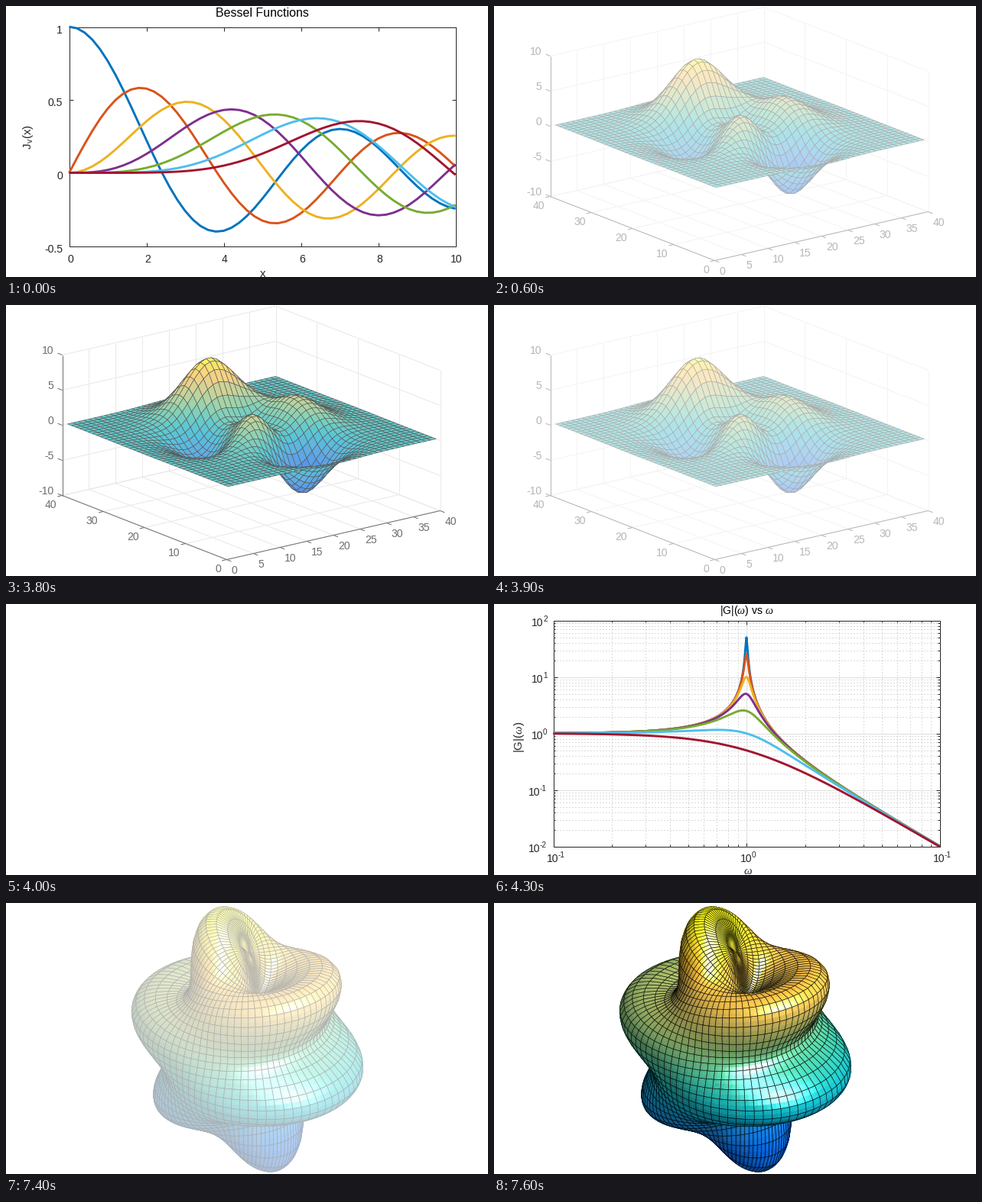
A matplotlib script for the animation above (8 s loop, 630 by 355 pixels).

```python
import numpy as np
import matplotlib.pyplot as plt
from matplotlib.animation import FuncAnimation
from matplotlib.collections import LineCollection, PolyCollection
from matplotlib.patches import Rectangle

W, H, DPI = 630, 355, 64
PX = 72 / DPI  # points per pixel
INK, GRID, MINOR = "#262626", "#dedede", "#b8b8b8"
COLORS = ["#0072BD", "#D95319", "#EDB120", "#7E2F8E",
          "#77AC30", "#4DBEEE", "#A2142F"]
RAMP = np.array([
    (.012, .388, .882), (.063, .474, .855), (.064, .557, .824),
    (.023, .642, .791), (.084, .693, .706), (.259, .732, .595),
    (.487, .749, .484), (.683, .744, .404), (.851, .730, .336),
    (.994, .746, .240), (.970, .848, .148), (.976, .983, .054)])

plt.rcParams.update({
    "font.family": "Liberation Sans",
    "mathtext.fontset": "custom",
    "mathtext.rm": "Liberation Sans",
    "mathtext.it": "Liberation Serif:italic",
})

fig = plt.figure(figsize=(W / DPI, H / DPI), dpi=DPI, facecolor="white")


def stage():
    """Full-size axes; pixels are counted from 1 at the top left."""
    ax = fig.add_axes([0, 0, 1, 1])
    ax.set_xlim(0.5, W + 0.5)
    ax.set_ylim(H + 0.5, 0.5)
    ax.axis("off")
    return ax


def segments(ax, segs, color=INK, width=1, style="solid"):
    ax.add_collection(LineCollection(segs, colors=color, linewidths=width * PX,
                                     linestyles=style), autolim=False)


def label(ax, x, y, text, size=14, ha="center", color=INK, **kw):
    """Text whose capitals are centred on height y."""
    ax.text(x, y + 0.36 * size, text, size=size * PX, ha=ha, va="baseline",
            color=color, **kw)


def side_label(ax, x, y, text, size=15):
    ax.text(x, y, text, size=size * PX, ha="center", va="baseline",
            rotation=90, rotation_mode="anchor", color=INK)


def power(ax, x, y, exponent):
    label(ax, x, y, "10", ha="right")
    label(ax, x - 0.5, y - 4, exponent, size=10, ha="left")


def ticks(ax, box, xs, ys, size):
    """Inward ticks on all four sides."""
    l, t, r, b = box
    for x in xs:
        segments(ax, [[(x, b), (x, b - size)], [(x, t), (x, t + size)]])
    for y in ys:
        segments(ax, [[(l, y), (l + size, y)], [(r, y), (r - size, y)]])


def frame(ax, box):
    l, t, r, b = box
    ax.add_patch(Rectangle((l, t), r - l, b - t, fill=False, ec=INK, lw=PX,
                           joinstyle="miter"))


def curve(ax, x, y, color):
    ax.plot(x, y, color=color, lw=2.9 * PX, solid_capstyle="butt",
            solid_joinstyle="round", zorder=3)


def ramp(t):
    spots = np.arange(8, 64, 5) / 63
    return np.stack([np.interp(t, spots, RAMP[:, k]) for k in range(3)], -1)


def quads(p):
    """Corner points of every cell of a point grid."""
    return np.stack([p[:-1, :-1], p[1:, :-1], p[1:, 1:], p[:-1, 1:]], 2)


def bessel(n, x):
    tau = (np.arange(400) + 0.5) * np.pi / 400
    return np.cos(n * tau - np.outer(x, np.sin(tau))).mean(axis=1)


def bessel_scene():
    ax = stage()
    box = l, t, r, b = 83, 28, 588, 315
    xs = [l + 101 * k for k in range(6)]
    ys = [28, 123, 219, 315]
    frame(ax, box)
    ticks(ax, box, xs, ys, 5)
    for k, x in enumerate(xs):
        label(ax, x + 1.5, 331, str(2 * k))
    for y, s in zip(ys, ["1", "0.5", "0", "-0.5"]):
        label(ax, 74.5, y + 3, s, ha="right")
    label(ax, 335.5, 8.5, "Bessel Functions", size=16, color="black")
    label(ax, 336.5, 350, "x", size=15)
    side_label(ax, 33, 172, r"J$_{\,\mathrm{v}}$(x)")
    x = np.arange(51) / 5
    for n, c in enumerate(COLORS):
        curve(ax, l + 50.5 * x, 219 - 191.3 * bessel(n, x), c)
    return ax


def peaks(x, y):
    return (3 * (1 - x) ** 2 * np.exp(-x ** 2 - (y + 1) ** 2)
            - 10 * (x / 5 - x ** 3 - y ** 5) * np.exp(-x ** 2 - y ** 2)
            - np.exp(-(x + 1) ** 2 - y ** 2) / 3)


def iso(x, y, z):
    return np.stack([289 + 6.975 * x - 5.375 * y,
                     242 - 1.6 * x - 2.1 * y - 9.2 * z], -1)


def peaks_scene():
    ax = stage()
    xs, ys, zs = range(0, 41, 5), range(0, 41, 10), range(-10, 11, 5)

    def line(a, b):
        return [iso(*a), iso(*b)]

    grid = []
    for x in xs:
        grid += [line((x, 0, -10), (x, 40, -10)), line((x, 40, -10), (x, 40, 10))]
    for y in ys:
        grid += [line((0, y, -10), (40, y, -10)), line((40, y, -10), (40, y, 10))]
    for z in zs:
        grid += [line((0, 40, z), (40, 40, z)), line((40, 40, z), (40, 0, z))]
    segments(ax, grid, GRID)

    marks = [line((0, 0, -10), (40, 0, -10)), line((0, 0, -10), (0, 40, -10)),
             line((0, 40, -10), (0, 40, 10))]
    for x in xs:
        marks.append(line((x, 0, -10), (x, -1.1, -10)))
        px, py = iso(x, 0, -10)
        label(ax, px + 6, py + 13, str(x), ha="left")
    for y in ys:
        marks.append(line((0, y, -10), (-0.9, y, -10)))
        px, py = iso(0, y, -10)
        label(ax, px - 7.5, py + 11, str(y), ha="right")
    for z in zs:
        marks.append(line((0, 40, z), (0, 41.1, z)))
        label(ax, 63, iso(0, 40, z)[1] - 7, str(z), ha="right")
    segments(ax, marks)

    n = np.arange(1, 41)
    x, y = np.meshgrid(n, n)
    z = peaks((x - 1) / 6.5 - 3, (y - 1) / 6.5 - 3)
    faces = ramp((z - z.min()) / np.ptp(z))[:-1, :-1].reshape(-1, 3)
    order = np.argsort(-(x + y)[:-1, :-1].ravel(), kind="stable")
    cells = quads(iso(x, y, z)).reshape(-1, 4, 2)
    ax.add_collection(PolyCollection(
        cells[order], facecolors=faces[order], edgecolors="black",
        linewidths=0.6 * PX, joinstyle="round", zorder=3), autolim=False)
    return ax


def gain_scene():
    ax = stage()
    box = l, t, r, b = 78, 22, 583, 318
    dx, dy = 252.5, 74
    xs = [l + dx * k for k in range(3)]
    ys = [b - dy * k for k in range(5)]
    logs = np.log10(np.arange(2, 10))
    minor_x = [round(x + dx * g) for x in xs[:-1] for g in logs]
    minor_y = [round(y - dy * g) for y in ys[:-1] for g in logs]

    def mesh(cols, rows):
        return ([[(x, b), (x, t)] for x in cols]
                + [[(l, y), (r, y)] for y in rows])

    segments(ax, mesh(minor_x, minor_y), MINOR, style=(0, (1, 3)))
    segments(ax, mesh(xs[1:-1], ys[1:-1]), GRID)
    frame(ax, box)
    ticks(ax, box, xs, ys, 5)
    ticks(ax, box, minor_x, minor_y, 2.5)

    for x, s in zip(xs, ["-1", "0", "-1"]):
        power(ax, x + 7, 333, s)
    for k, y in enumerate(ys):
        power(ax, 60.5 if k < 2 else 65, y + 2, str(k - 2))
    ax.text(330.5, 14, r"|G|($\omega$) vs $\omega$", size=14 * PX,
            ha="center", va="baseline", color="black")
    ax.text(332.5, 354, r"$\omega$", size=15 * PX, ha="center", va="baseline",
            color=INK)
    side_label(ax, 37.5, 175, r"|G|($\omega$)")

    e = np.linspace(-1, 1, 401)
    w = 10 ** e
    for zeta, c in zip([.01, .02, .05, .1, .2, .5, 1], COLORS):
        gain = 1 / np.hypot(1 - w ** 2, 2 * zeta * w)
        curve(ax, l + dx * (e + 1), 170 - dy * np.log10(gain), c)
    return ax


def harmonic_scene():
    ax = stage()
    rows, cols = 40, 80
    theta = np.linspace(0, np.pi, 2 * rows + 1)[:, None]
    phi = np.linspace(0, 2 * np.pi, 2 * cols + 1)[None, :]
    u = np.cos(theta)
    wave = -np.sin(theta) * (33 * u ** 5 - 30 * u ** 3 + 5 * u)
    radius = 1 + 0.4 * wave / np.abs(wave).max() * np.cos(phi)
    p = np.stack([radius * np.sin(theta) * np.cos(phi),
                  radius * np.sin(theta) * np.sin(phi), radius * u], -1)

    az, el = np.radians([40, 30])
    right = np.array([np.cos(az), np.sin(az), 0])
    up = np.array([-np.sin(az) * np.sin(el), np.cos(az) * np.sin(el), np.cos(el)])
    eye = np.cross(right, up)
    light = np.array([1, 0, 1]) / np.sqrt(2)

    def flat(q):
        return np.stack([316 + 132.3 * q @ right, 179 - 132.3 * q @ up], -1)

    def normals(q):
        n = np.cross(q[..., 2, :] - q[..., 0, :], q[..., 3, :] - q[..., 1, :])
        n /= np.linalg.norm(n, axis=-1, keepdims=True) + 1e-12
        return n * np.sign((n * q.mean(-2)).sum(-1, keepdims=True))

    fine, coarse = quads(p), quads(p[::2, ::2])
    n = normals(fine)
    lit = n @ light
    mirror = 2 * lit[..., None] * n - light
    shine = 0.7 * np.where(lit > 0, np.clip(mirror @ eye, 0, 1), 0) ** 10
    z = fine[..., 2].mean(-1)
    base = ramp((z / p[..., 2].max() + 1) / 2)
    rgb = base * (0.58 + 0.62 * np.clip(lit, 0, 1))[..., None] + shine[..., None]
    rgba = np.concatenate([np.clip(rgb, 0, 1), np.ones(z.shape + (1,))], -1)

    # Each cell is four shaded patches followed by its black outline.
    def grouped(a):
        a = a.reshape(rows, 2, cols, 2, -1).swapaxes(1, 2)
        return a.reshape(rows * cols, 4, -1)

    outline = flat(coarse).reshape(-1, 1, 8)
    polys = np.concatenate([grouped(flat(fine)), outline], 1)
    patch = grouped(rgba)
    blank = np.zeros((rows * cols, 1, 4))
    faces = np.concatenate([patch, blank], 1)
    edges = np.concatenate([patch, blank + [0, 0, 0, 1]], 1)

    depth = (coarse.mean(-2) @ eye).ravel()
    order = np.argsort(depth)
    order = order[(normals(coarse) @ eye).ravel()[order] > -0.1]
    ax.add_collection(PolyCollection(
        polys[order].reshape(-1, 4, 2), facecolors=faces[order].reshape(-1, 4),
        edgecolors=edges[order].reshape(-1, 4),
        linewidths=np.tile([0.4] * 4 + [0.6], len(order)) * PX,
        joinstyle="round"), autolim=False)
    return ax


scenes = [bessel_scene(), peaks_scene(), gain_scene(), harmonic_scene()]
veil = fig.add_artist(Rectangle((0, 0), 1, 1, transform=fig.transFigure,
                                fc="white", ec="none", zorder=10))
STARTS = [-3, 5, 40, 73]  # step at which each scene begins its fade-in


def update(step):
    current = sum(step >= s for s in STARTS) - 1
    fade = max(0, 1 - (step - STARTS[current]) / 3)
    if current == 1 and step >= 38:
        fade = (step - 37) / 3
    for k, ax in enumerate(scenes):
        ax.set_visible(k == current and fade < 1)
    veil.set_alpha(fade)
    return [veil]


anim = FuncAnimation(fig, update, frames=80, interval=100, repeat=True,
                     repeat_delay=0, blit=False)
plt.show()
```
